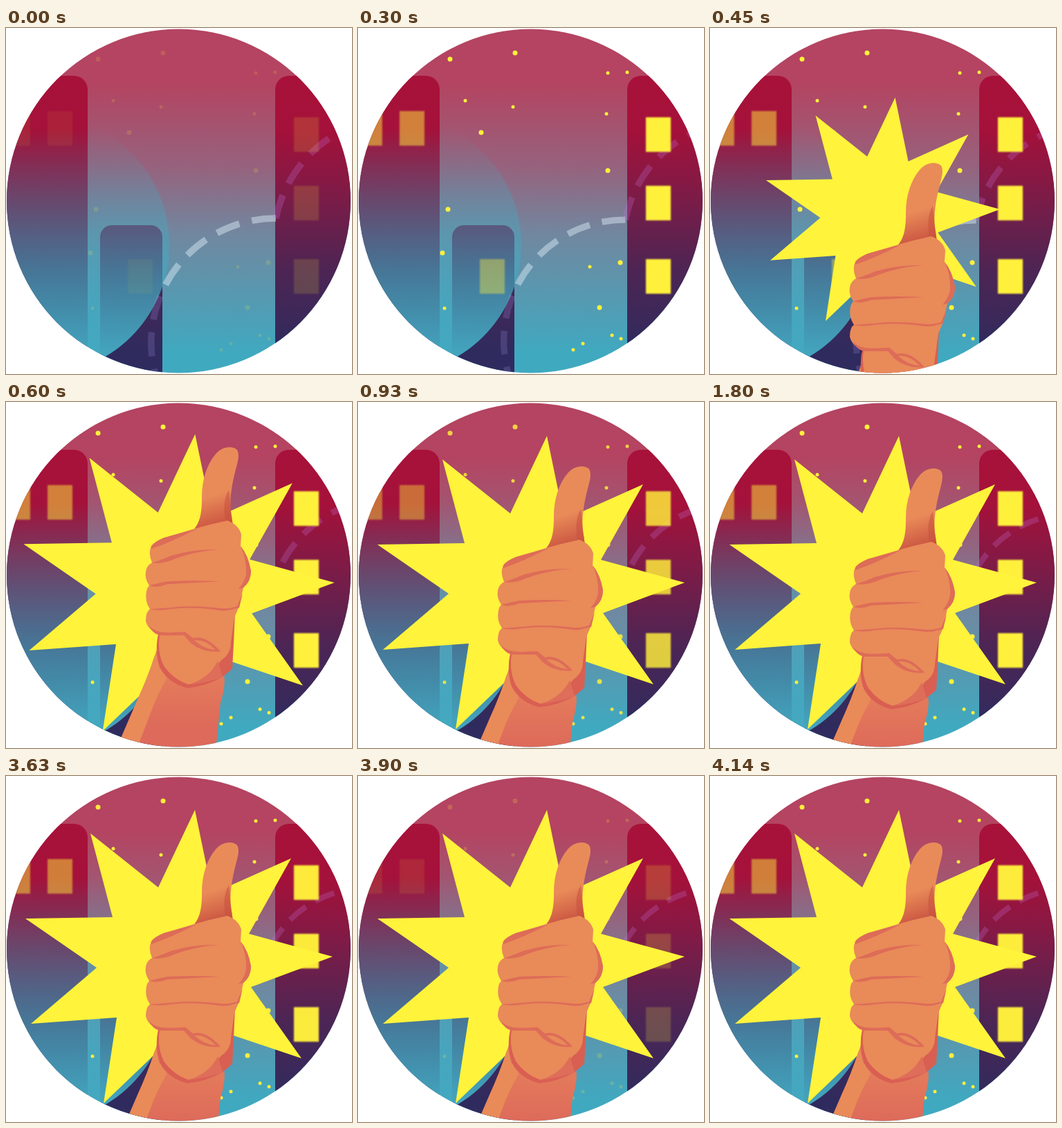
These frames come from a looping animation (500 by 500 pixels, 4.5 s). An HTML page:

```html
<!DOCTYPE html>
<html lang="en">
<head>
<meta charset="utf-8">
<title>Thumbs up</title>
<style>
  html, body { margin: 0; width: 100%; height: 100%; overflow: hidden; background: #fff; }
  svg { display: block; width: 100%; height: 100%; }
</style>
</head>
<body>
<svg viewBox="0 0 500 500">
  <defs>
    <clipPath id="disc"><circle cx="249.5" cy="250" r="248.5"/></clipPath>
    <linearGradient id="sky" gradientUnits="userSpaceOnUse" x1="0" y1="0" x2="0" y2="500">
      <stop offset=".16" stop-color="#b44461"/>
      <stop offset=".4" stop-color="#96627d"/>
      <stop offset=".6" stop-color="#7088a0"/>
      <stop offset=".94" stop-color="#3fa9c0"/>
    </linearGradient>
    <linearGradient id="wall" gradientUnits="userSpaceOnUse" x1="0" y1="69" x2="0" y2="470">
      <stop offset="0" stop-color="#a8123a"/>
      <stop offset=".2" stop-color="#a4113a"/>
      <stop offset=".45" stop-color="#7a1c48"/>
      <stop offset=".7" stop-color="#4d2554"/>
      <stop offset="1" stop-color="#2f2b5e"/>
    </linearGradient>
    <linearGradient id="haze" gradientUnits="userSpaceOnUse" x1="0" y1="145" x2="0" y2="480">
      <stop offset="0" stop-color="#44a8c0" stop-opacity="0"/>
      <stop offset="1" stop-color="#44a8c0"/>
    </linearGradient>
    <linearGradient id="trailL" gradientUnits="userSpaceOnUse" x1="0" y1="285" x2="0" y2="485">
      <stop offset="0" stop-color="#b8d4f0" stop-opacity=".32"/>
      <stop offset=".3" stop-color="#b8e4f0" stop-opacity=".45"/>
      <stop offset=".78" stop-color="#b8e4f0" stop-opacity=".42"/>
      <stop offset=".86" stop-color="#a090e0" stop-opacity=".22"/>
    </linearGradient>
    <linearGradient id="trailM" gradientUnits="userSpaceOnUse" x1="0" y1="275" x2="0" y2="475">
      <stop offset=".48" stop-color="#d4e6f2" stop-opacity=".5"/>
      <stop offset=".58" stop-color="#a090e0" stop-opacity=".22"/>
    </linearGradient>
    <linearGradient id="skin" gradientUnits="userSpaceOnUse" x1="0" y1="410" x2="0" y2="500">
      <stop offset="0" stop-color="#e67f5b"/>
      <stop offset="1" stop-color="#dd6a5a"/>
    </linearGradient>
    <linearGradient id="thumb" gradientUnits="userSpaceOnUse" x1="298" y1="165" x2="312" y2="212">
      <stop offset="0" stop-color="#e98b59"/>
      <stop offset="1" stop-color="#c8503f"/>
    </linearGradient>
  </defs>
  <g clip-path="url(#disc)">
    <rect width="500" height="500" fill="url(#sky)"/>
    <g fill="url(#wall)">
      <rect x="-40" y="69" width="158" height="460" rx="20"/>
      <rect x="389" y="69" width="160" height="460" rx="20"/>
      <rect x="136" y="285" width="90" height="240" rx="17"/>
    </g>
    <circle cx="48" cy="313" r="188" fill="url(#haze)"/>
    <g id="trail" fill="none" stroke-width="9.5" stroke-dasharray="35 18.5">
      <path d="M-180 465A180 180 0 0 1 90 621" stroke="url(#trailL)" stroke-dashoffset="-27.2"/>
      <path d="M390 275A180 180 0 0 0 300 611" stroke="url(#trailM)"/>
      <path d="M390 275A183 183 0 0 1 569 128" stroke="#c070d8" stroke-opacity=".26"/>
    </g>
    <g id="lights" fill="#fff03c"></g>
    <path id="burst" fill="#fff33b" d="M273 49L298 170 412 119 351 228 472 261 354 305 427 408 290 362 235 383 141 473 160 349 36 358 131 277 28 206 154 204 122 83 220 161Z"/>
    <g id="hand">
      <path fill="url(#skin)" d="M224 372L214 400Q205 428 190 461L158 535H303L310 465Q318 440 315 425L300 380Z"/>
      <path fill="#e98a59" d="M222 384L214 400Q205 428 190 461L158 535H188L209 480Q218 455 232 431Z"/>
      <path fill="#d95f52" d="M221 362Q214 390 222 414Q234 437 262 444Q288 442 313 428L327 416 329 380 331 335 250 350Z"/>
      <path fill="#e98a59" d="M223 362Q217 390 228 412Q242 432 264 439Q288 434 311 404Q325 395 325 378L331 335 250 340Z"/>
      <path fill="#de6e5a" d="M264 439Q290 437 313 428L306 405Q294 430 264 439Z"/>
      <path fill="url(#thumb)" d="M268 219C282 205 283 188 283 168C283 142 291 120 303 106C311 96 325 93 333 99C338 104 336 114 332 128C326 151 323 172 325 189L328 210 300 226Z"/>
      <path fill="#c8503f" opacity=".55" d="M322 158Q311 176 318 206L328 208 325 188Z"/>
      <path fill="#e98a59" d="M210 239Q214 233 228 227L272 214Q296 207 320 202Q336 208 340 222L339 239Q350 252 354 275Q354 290 343 299L337 326Q333 336 328 346Q324 368 300 369L255 362 222 366Q205 361 202 347Q202 334 208 330Q200 318 203 304Q204 299 207 296Q200 285 202 276Q203 267 211 263Q205 248 210 239Z"/>
      <g fill="#dd6c58">
        <path d="M210 239Q214 233 228 227L276 214Q239 233 210 243Z"/>
        <path d="M211 263Q225 266 245 257Q275 246 308 244Q270 243 238 253Q222 260 211 263Z"/>
        <path d="M207 296Q217 300 233 294Q270 292 309 290Q270 288 233 290Q218 293 207 296Z"/>
        <path d="M207 330Q220 333 237 330Q268 326 303 331Q318 334 328 330L337 328 342 307 334 326Q320 331 302 328Q265 324 236 328Z"/>
        <path d="M339 239Q350 252 354 275Q354 290 343 299L336 301Q349 286 347 271Q346 254 339 239Z"/>
        <path d="M207 354Q214 364 236 364L259 363 270 372Q289 367 310 391Q285 394 267 379L257 368 222 368Q211 365 207 354Z"/>
      </g>
      <path fill="#e98a59" d="M272 375Q288 373 303 389Q286 388 272 375Z"/>
    </g>
  </g>
</svg>
<script>
const $ = id => document.getElementById(id);
const LOOP = 4500;
const trail = $('trail'), lights = $('lights'), burst = $('burst'), hand = $('hand');

const pane = (x, y, a) =>
  `<rect x="${x}" y="${y}" width="36" height="50" opacity="${a}" style="filter:blur(.8px)"/>`;
const dots = (list, r) =>
  list.map(([x, y]) => `<circle cx="${x}" cy="${y}" r="${r}"/>`).join('');

lights.innerHTML =
  [129, 228, 334].map(y => pane(416, y, 1)).join('') +
  pane(60, 120, .5) + pane(-1, 120, .5) + pane(176, 334, .4) +
  dots([[133, 45], [227, 36], [178, 151], [361, 206], [130, 262], [122, 325], [349, 404], [379, 339]], 3.5) +
  dots([[155, 105], [224, 114], [361, 65], [389, 64], [359, 124], [335, 345], [125, 405],
        [367, 444], [380, 449], [325, 456], [311, 465]], 2.5);

const part = (t, a, b) => Math.min(1, Math.max(0, (t - a) / (b - a)));
const easeOut = p => Math.sin(p * Math.PI / 2);
const easeInOut = p => (1 - Math.cos(p * Math.PI)) / 2;
const zoom = (el, s, x, y) =>
  el.setAttribute('transform', `translate(${x} ${y}) scale(${s}) translate(${-x} ${-y})`);

// Lights dim briefly around these moments
const glow = t => Math.min(1, .15 + .85 * Math.min(...[0, 1140, 3885].map(c => Math.abs(t - c))) / 260);

function draw(t) {
  zoom(trail, 1 - .15 * part(t, 0, 1800), 245, 355);
  lights.setAttribute('opacity', glow(t));

  zoom(burst, 1.012 * easeOut(part(t, 310, 570)) - .012 * easeInOut(part(t, 570, 870)), 250, 265);
  const y = 420 - 451 * easeOut(part(t, 330, 570)) + 31 * easeInOut(part(t, 570, 1020));
  hand.setAttribute('transform', `translate(0 ${y})`);
}

const start = performance.now();
function tick() {
  draw((performance.now() - start) % LOOP);
  requestAnimationFrame(tick);
}
draw(0);
requestAnimationFrame(tick);
</script>
</body>
</html>
```
